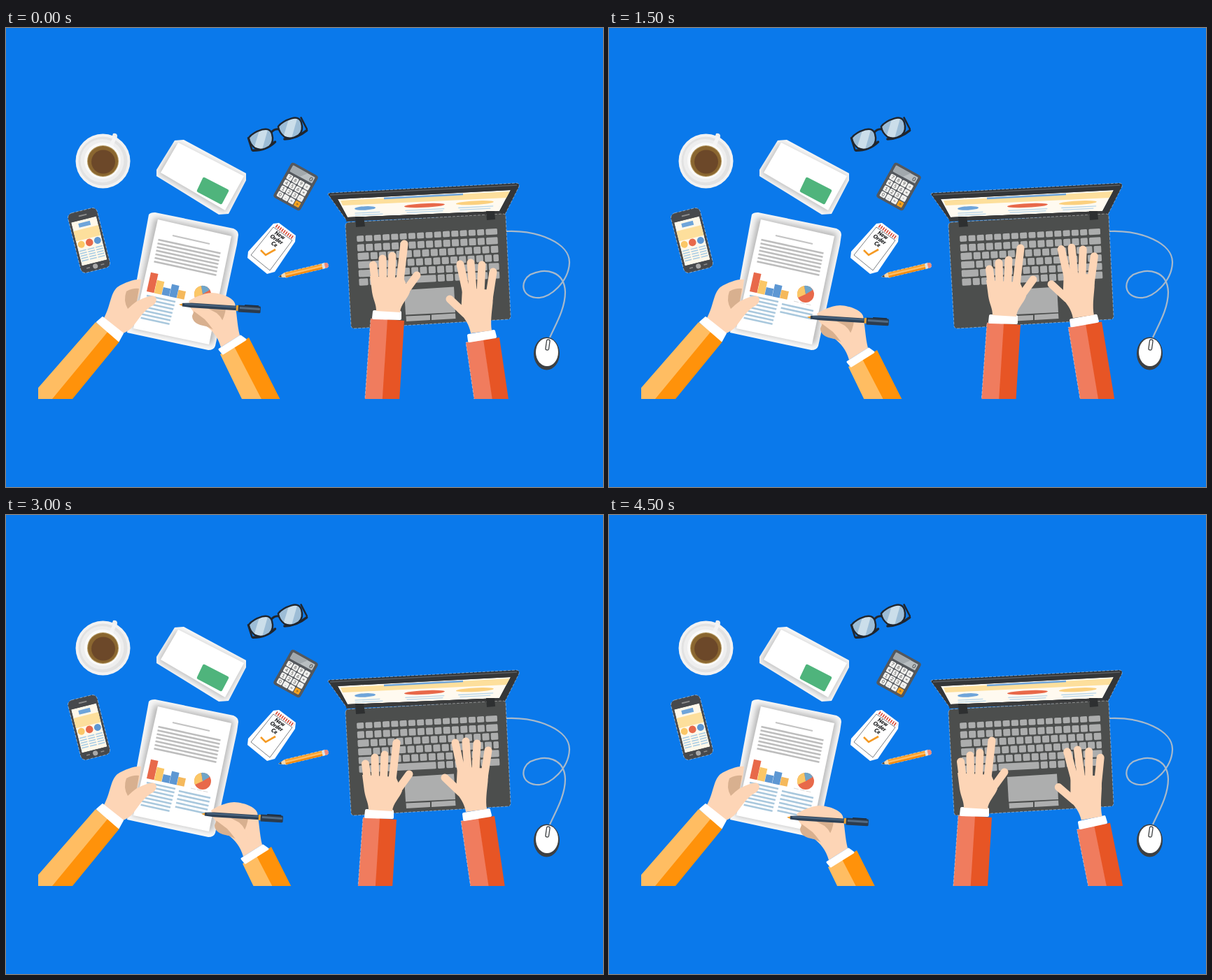
An HTML page for the animation above (5000 ms loop, 853 by 657 pixels).

```html
<!DOCTYPE html>
<html lang="en">
<head>
<meta charset="utf-8">
<title>Desk at work</title>
<style>
html, body { margin: 0; width: 100%; height: 100%; overflow: hidden; background: #0a79eb; }
svg { display: block; width: 100vw; height: 100vh; }
.fringe { stroke: #fff; stroke-width: .8; stroke-dasharray: 4 2; stroke-opacity: .5; }
.skin { fill: #fdd5b6; }
.finger { fill: none; stroke: #fdd5b6; stroke-width: 11; stroke-linecap: round; stroke-linejoin: round; }
.shade { fill: #d8b08f; }
.white { fill: #fff; }
.round { stroke-linejoin: round; stroke-linecap: round; }
text { font-family: Lato, sans-serif; text-anchor: middle; }
</style>
</head>
<body>
<svg viewBox="0 0 853 657" preserveAspectRatio="none">
<defs>
  <filter id="soft" x="-20%" y="-20%" width="140%" height="140%"><feGaussianBlur stdDeviation="4"/></filter>
  <clipPath id="desk"><rect width="853" height="531"/></clipPath>
  <clipPath id="envClip"><path id="env" d="M241 161L254 160 343 208V218L318 266 304 267 215 212V203Z"/></clipPath>
  <clipPath id="sheetClip"><path id="sheet" d="M204 267Q206 264 213 264L325 287Q332 290 332 296L330 310 299 455Q297 461 289 461L173 436Z"/></clipPath>
  <clipPath id="lens"><path id="lensShape" d="M-16 -9Q-8 -14 6 -13Q17 -12 17 -3Q16 10 7 13Q-6 16 -13 8Q-18 0 -16 -9Z"/></clipPath>
  <clipPath id="phoneScreen"><rect x="-18.500" y="-31" width="37" height="64"/></clipPath>
  <clipPath id="lid"><path d="M474 245L721 232 705 262 488 271Z"/></clipPath>
</defs>
<rect width="853" height="657" fill="#0a79eb"/>

<g id="coffee">
  <path d="M150 160L153 151Q158 150 159 154L158 164Z" fill="#eee"/>
  <circle cx="138.500" cy="190.500" r="39" fill="#f2f2f2"/>
  <circle cx="138.500" cy="190.500" r="35" fill="#e2e2e2"/>
  <circle cx="137.500" cy="190" r="31" fill="#eee"/>
  <path d="M143 176L154 154 158 157 150 177Z" fill="#f4f4f4"/>
  <circle cx="138" cy="190" r="26" fill="#fafafa"/>
  <circle cx="138.500" cy="190.500" r="22.500" fill="#b59a62"/>
  <circle cx="138.500" cy="190.500" r="21.500" fill="#8a6630"/>
  <circle cx="139" cy="191.500" r="17" fill="#6c4829"/>
</g>

<g id="envelope">
  <use href="#env" fill="#f8f8f8"/>
  <g clip-path="url(#envClip)">
    <path d="M243 164L341 213 313 264 217 208Z" fill="#bdbdbd" filter="url(#soft)"/>
    <path d="M246 164L340 212 313 261 221 207Z" class="white"/>
  </g>
  <path d="M284 214L317 231Q319 232 318 234L309 251Q308 253 306 252L274 235Q272 234 273 232L281 215Q282 213 284 214Z" fill="#4fb47c"/>
</g>

<g id="glasses" transform="translate(386.500 151.500) rotate(-21)">
  <path d="M-40 10Q-22 17 -6 10M8 11Q24 17 42 11" fill="none" stroke="#20262e" stroke-width="3.500" stroke-linecap="round"/>
  <path d="M-7 -4Q0 -9 7 -4" fill="none" stroke="#20262e" stroke-width="3"/>
  <g id="lenses"></g>
  <path d="M-40 -9L-41 9M41 -9L43 9" stroke="#20262e" stroke-width="2.500" stroke-linecap="round"/>
</g>

<g id="calc" transform="translate(414 227) rotate(29)">
  <rect x="-22" y="-28.500" width="44" height="57" rx="4" fill="#54585d"/>
  <rect x="-18" y="-25" width="36" height="10" rx="1" fill="#b9bfc2"/>
  <path d="M-18 -25H6L-2 -15H-18Z" fill="#a2a9ad"/>
  <text x="14" y="-17" font-size="8" fill="#333">0</text>
  <g id="calcKeys"></g>
</g>

<g id="phone" transform="translate(118.500 304) rotate(-14)">
  <rect x="-21.500" y="-44" width="43" height="88" rx="7" fill="#47494c" class="fringe"/>
  <rect x="-6" y="-38" width="12" height="2" rx="1" fill="#8c8c8c"/>
  <circle cy="38" r="3.600" fill="#a9a9a9"/>
  <path d="M-13 38H-8M8 38H13" stroke="#8c8c8c" stroke-width="1.500"/>
  <g clip-path="url(#phoneScreen)">
    <rect x="-18.500" y="-31" width="37" height="64" fill="#fff8ea"/>
    <rect x="-18.500" y="-18" width="37" height="15" fill="#fddf9c"/>
    <rect x="-9" y="-27" width="17" height="6" fill="#6fa5da"/>
    <circle cx="-12" cy="3" r="5" fill="#fbc766"/>
    <circle cx="0" cy="3" r="5.300" fill="#e8694a"/>
    <circle cx="12" cy="3" r="5" fill="#5d97d3"/>
    <g id="phoneLines" stroke="#a6cbe4" stroke-width="1.500"></g>
  </g>
</g>

<g id="paper">
  <use href="#sheet" fill="#f8f8f8"/>
  <g clip-path="url(#sheetClip)">
    <path d="M212 271L326 294 295 453 180 430Z" fill="#b6b6b6" filter="url(#soft)"/>
    <path d="M217 274L322 298 290 453 182 430Z" class="white"/>
  </g>
  <path d="M238 297L291 309" stroke="#c4c4c4" stroke-width="2.200"/>
  <g id="textLines" stroke="#bdbdbd" stroke-width="2.600"></g>
  <g id="bars" transform="translate(201 377) rotate(12.500)"></g>
  <g id="pie" transform="translate(281 381)">
    <circle r="12" fill="#e8694a"/>
    <path d="M0 0L-11 5A12 12 0 0 1 -2 -12Z" fill="#fbc766"/>
    <path d="M0 0L-2 -12A12 12 0 0 1 10 -6Z" fill="#6fa5c8"/>
  </g>
  <path d="M264 391L290 397" stroke="#d9d9d9" stroke-dasharray="7 2"/>
  <g id="doneLines" stroke="#a9c8dd" stroke-width="2.600"></g>
  <g id="newLines" stroke="#a9c8dd" stroke-width="2.600"></g>
</g>

<g id="notepad">
  <path d="M382 280L390 279 414 297 413 306 384 349 373 352 345 329 346 320Z" fill="#fff"/>
  <path d="M382 285L409 304 377 347 350 325Z" fill="#fff" stroke="#5a5f64" stroke-width=".8"/>
  <path d="M386 283L411 301" stroke="#d94c3a" stroke-width="5" stroke-dasharray="1.700 1.700"/>
  <g transform="translate(390 299) rotate(32)" font-size="8" font-style="italic" font-weight="900" fill="#16181a">
    <text>New</text><text x="-1" y="7.500">Order</text><text y="15">Ce</text>
  </g>
  <path d="M364 318L371 325 385 317" fill="none" stroke="#f59a23" stroke-width="2.600"/>
</g>

<g id="pencil" transform="translate(389.500 356) rotate(-13.500)">
  <path d="M0 0L10 -3.800H70Q73 -3.500 73 0T70 3.800H10Z" fill="#f9a02c" class="fringe"/>
  <path d="M0 0L10 -3.800V3.800Z" fill="#f7d9b0"/>
  <path d="M0 0L4 -1.600V1.600Z" fill="#34383c"/>
  <path d="M10 -1.300H64V1.300H10Z" fill="#ffbd62"/>
  <path d="M10 1.300H64V3.800H10Z" fill="#f08a10"/>
  <path d="M64 -3.800H68V3.800H64Z" fill="#dfe3e6"/>
  <path d="M68 -3.800H70Q73 -3.500 73 0T70 3.800H68Z" fill="#ef8b80"/>
</g>

<g id="laptop">
  <path d="M715 291C760 289 806 308 805 336C804 362 778 388 757 386C735 383 735 362 749 353C770 343 798 347 799 378C799 402 785 425 777 443" fill="none" stroke="#a8b9ca" stroke-width="2.200"/>
  <path d="M460 238Q460 236 464 236L729 222Q734 222 733 227L713 267 487 276Z" fill="#343638" class="fringe"/>
  <path d="M463 239L730 225" stroke="#5c5e60" stroke-width="1.500"/>
  <g clip-path="url(#lid)">
    <path d="M474 245L721 232 705 262 488 271Z" fill="#fffaf0"/>
    <path d="M478 247L720 234 715 243 481 254Z" fill="#fddf9c"/>
    <path d="M540 244L653 238" stroke="#6fa5da" stroke-width="2.600"/>
    <g transform="rotate(-3 598 254)">
      <ellipse cx="513" cy="253.500" rx="15" ry="2.800" fill="#6fa5da"/>
      <ellipse cx="598" cy="254" rx="29" ry="2.800" fill="#e8694a"/>
      <ellipse cx="670" cy="254" rx="27" ry="2.800" fill="#fbd07e"/>
      <path d="M498 260H534M498 263H538M570 260H626M572 263H624M646 260H696M648 263H692" stroke="#b7d6ea" stroke-width="1.300"/>
    </g>
  </g>
  <path d="M487 271L706 262 710 267 486 277Z" fill="#3a3b3c"/>
  <path d="M485 283Q485 279 489 278L710 266Q714 266 714 270L721 412Q721 417 717 417L498 430Q493 430 493 426Z" fill="#4c4e4d" class="fringe"/>
  <path d="M499 270H511L513 284 500 285ZM686 262H698L699 274 687 275Z" fill="#2e3031"/>
  <g id="keys" transform="translate(501 297.500) rotate(-3)" fill="#acadad"></g>
  <path d="M569 375L640 370.500 642 407 571 410.500Z" fill="#adaeae"/>
  <path d="M571.500 412.500L606 411V418L572 420ZM608 410.500L642 408.500 642.500 416 608 418Z" fill="#adaeae"/>
  <ellipse cx="772.500" cy="466" rx="18.500" ry="23.500" fill="#3d4043"/>
  <ellipse cx="773" cy="464" rx="16" ry="20" class="white"/>
  <rect x="771.800" y="446" width="4.600" height="15" rx="2" fill="#fff" stroke="#3d4043" stroke-width="1.300" transform="rotate(8 774 453)"/>
</g>

<g id="holdingArm">
  <path d="M46 515L128 421 147 435 67 531H46Z" fill="#ffbd62"/>
  <path d="M146 434L162 449 95 531H66Z" fill="#ff920a"/>
  <path d="M140 415C150 396 149 380 159 371C170 364 185 359 193 360L191 377 187 391C197 387 205 382 212 384C217 387 215 393 210 397C196 405 191 415 183 425C177 433 171 436 164 438Z" class="skin"/>
  <path d="M172 377Q181 372 190 373L187 391Q180 396 174 402Q167 390 172 377Z" class="shade"/>
  <path d="M130 421L138 414 167 437 161 448Z" class="white round" stroke="#fff" stroke-width="2"/>
</g>

<g clip-path="url(#desk)">
  <g id="leftHand">
    <path d="M521 416L546 417 535 600H508Z" fill="#f07c5e" class="fringe"/>
    <path d="M545 417L569 419 558 600H533.500Z" fill="#e75525"/>
    <path d="M526 406L563 407 563 416 525 415Z" class="white round" stroke="#fff" stroke-width="4"/>
    <path d="M524.500 339L529 374M538 330L539 372M552 326L550 372M569 309L562 370" class="finger"/>
    <path d="M587 354L566 383" class="finger"/>
    <path d="M520 355L523 378C525 390 529 395 529 405L563 407C564 395 573 389 577 378L568 358Z" class="skin"/>
  </g>
  <g id="rightHand">
    <path d="M657 450L683 446 706 600H679Z" fill="#f07c5e" class="fringe"/>
    <path d="M682 446L705 443 728 600H705Z" fill="#e75525"/>
    <path d="M661 440L697 434 699 442 662 448Z" class="white round" stroke="#fff" stroke-width="4"/>
    <path d="M649 338L658 380M664 336L667 376M680 339L678 378M696 349L690 388" class="finger"/>
    <path d="M634 388L656 409" class="finger"/>
    <path d="M652 372L696 375 695.500 393C694 408 692 420 694 433L664 437C662 424 655 416 650 409Z" class="skin"/>
  </g>
  <g id="penHand">
    <path d="M306 467L327 455 380 560H351Z" fill="#ffbd62"/>
    <path d="M326 456L347 443 406 560H380Z" fill="#ff920a"/>
    <path d="M261 391C268 386 280 380 294 379C310 380 324 386 327 394C330 408 330 424 334 440L307 457C303 442 295 434 287 427C276 425 268 417 268 408L264 398Z" class="skin"/>
    <path d="M270 402L314 401Q313 413 306 424L297 432 286 427Q266 424 266 412Z" class="shade"/>
    <path d="M263 397Q270 392 278 396L301 408Q311 416 313 432L304 444Q294 428 284 417L268 405Q262 401 263 397Z" class="skin"/>
    <path d="M305 460L335 441 342 446 310 466Z" class="white round" stroke="#fff" stroke-width="3"/>
    <g transform="translate(247 395.800) rotate(3.500)">
      <path d="M0 0L6 -2.200V2.200Z" fill="#e99a2b"/>
      <path d="M5 -2.300L18 -3.300H84V3.300H18L5 2.300Z" fill="#2e4257"/>
      <path d="M8 -1.800L18 -2.500H84V0H8Z" fill="#48627c"/>
      <path d="M82 -4H85V4H82Z" fill="#f0a22e"/>
      <path d="M85 -4.500H115Q117 -4.500 117 -3V4Q117 5.500 115 5.500H85Z" fill="#2b3b4d"/>
      <path d="M87 -2H116V1H87Z" fill="#526b84"/>
      <path d="M94 -5.500H114V-4H94Z" fill="#202c39"/>
    </g>
  </g>
</g>
</svg>
<script>
const $ = id => document.getElementById(id);
const NS = 'http://www.w3.org/2000/svg';

function add(parent, tag, attrs, label) {
  const el = document.createElementNS(NS, tag);
  for (const k in attrs) el.setAttribute(k, attrs[k]);
  if (label !== undefined) el.textContent = label;
  return $(parent).appendChild(el);
}

const box = (parent, x, y, width, height, fill, rx = 0) =>
  add(parent, 'rect', { x, y, width, height, rx, ...(fill && { fill }) });

// Parallel strokes: start point, stroke vector, step to the next row.
function rows(parent, n, [x, y], [w, h], [sx, sy]) {
  for (let i = 0; i < n; i++)
    add(parent, 'path', { d: `M${x + i * sx} ${y + i * sy}l${w} ${h}` });
}

for (const x of [-23, 22]) {
  const g = add('lenses', 'g', { transform: `translate(${x} 0)` });
  g.innerHTML = `<use href="#lensShape" fill="#9dbdd6"/>
    <path clip-path="url(#lens)" d="M-18 12L4 -16H18L-6 16Z" fill="#cbdeea"/>
    <use href="#lensShape" fill="none" stroke="#20262e" stroke-width="2.400"/>`;
}

[...'789÷456×123-0.=+'].forEach((c, i) => {
  const x = -18 + i % 4 * 9.3, y = -11.5 + (i >> 2) * 9.4;
  box('calcKeys', x, y, 8.2, 8.2, i === 15 ? '#f6a21e' : '#f1f1ef', 1.5);
  add('calcKeys', 'text', { x: x + 4.1, y: y + 6.3, 'font-size': 6.5, fill: '#444' }, c);
});

for (const x of [-17, -5, 7]) rows('phoneLines', 5, [x, 12], [10, 0], [0, 3.6]);

rows('textLines', 7, [217.5, 303], [89, 19.5], [-1, 5.2]);
rows('doneLines', 7, [201, 383], [41, 9], [-1.4, 5.3]);
rows('newLines', 6, [247, 395], [45, 10], [-1.3, 5.6]);

['#e8694a 28', '#fbc766 19', '#5d97d3 11', '#5d97d3 18', '#f5b95c 12'].forEach((bar, i) => {
  const [fill, h] = bar.split(' ');
  box('bars', i * 11, -h, 10.7, +h, fill);
});

// Each row starts with a wider key, the last key fills the rest.
[10, 10, 16, 19, 24, 13].forEach((first, r) => {
  let x = 0;
  for (let i = 0; x < 199; i++) {
    let w = i ? 10 : first;
    if (r === 5 && i === 4) w = 58;
    if (201 - x - w < 9) w = 201 - x;
    box('keys', x, r * 12.3, w, r ? 10 : 8.5, null, 1.5);
    x += w + 2.3;
  }
});

// pen x, y, left hand x, y, right hand x, y, tilt, finished lines
const poses = [
  [0, 0, 0, 0, 0, 0, 0, 0],
  [38, 8, 6, 2, 6, -6, 0, 1],
  [-2, 8, -9, 6, 16, 14, 0, 2],
  [36, 18, 19, 6, -1, -22, -1, 3],
  [-4, 13, -17, 34, 62, 22, 0, 3],
  [34, 25, 8, -20, -4, -14, 0, 4],
  [32, 32, -11, 17, -7, -12, 0, 5],
  [-6, 29, -28, -21, -9, -18, -3, 5],
  [30, 36, -46, -5, -30, -41, -10, 6],
  [7, 37, -22, 14, 11, -1, -3, 6]
];

function draw(time) {
  const [px, py, lx, ly, rx, ry, tilt, done] = poses[Math.floor(time % 5000 / 500)];
  $('penHand').setAttribute('transform', `translate(${px} ${py})`);
  $('leftHand').setAttribute('transform', `translate(${lx} ${ly})`);
  $('rightHand').setAttribute('transform', `translate(${rx} ${ry}) rotate(${tilt} 680 441)`);
  [...$('newLines').children].forEach((line, i) =>
    line.setAttribute('visibility', i < done ? 'visible' : 'hidden'));
}

const start = performance.now();
function tick() {
  draw(performance.now() - start);
  requestAnimationFrame(tick);
}
tick();
</script>
</body>
</html>
```
